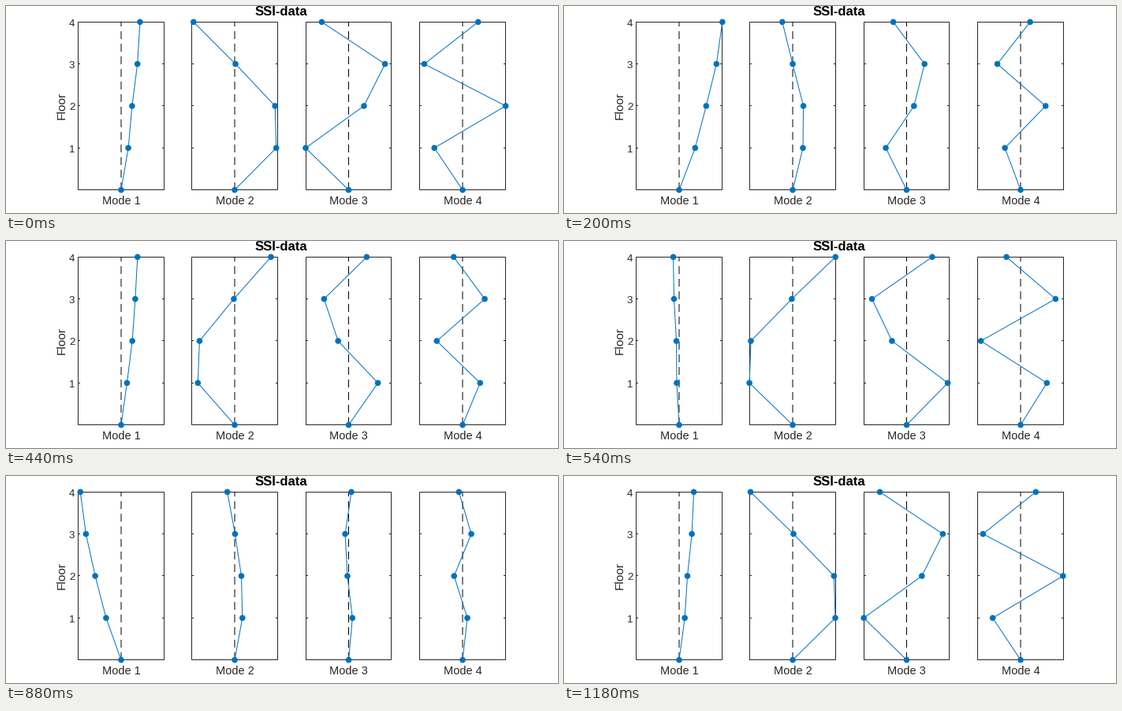
Recreate the animation shown at these times as a matplotlib script. Size 700 by 263 pixels, loop 1.2 s.

```python
import numpy as np
import matplotlib.pyplot as plt
from matplotlib.animation import FuncAnimation
from matplotlib.patches import Circle, Rectangle

W, H, DPI = 700, 263, 100
FRAMES, INTERVAL = 60, 20
BLUE, INK = "#0072BD", "#262626"
TOP, BOTTOM = 20.5, 233.5
FLOOR_Y = 233.7 - 53.35 * np.arange(5)

# Left and right edge of each panel
PANELS = [(91.5, 200.5), (235.5, 344.5), (380.5, 488.5), (524.5, 633.5)]

# Complex mode shapes in pixels, ground floor to top floor
SHAPES = np.array([
    [0, 9.1 + 18.2j, 13.9 + 31.6j, 20.7 + 42.7j, 23.9 + 49.5j],
    [0, 52.7 - 15.4j, 51.2 - 13.9j, 1 - 0.55j, -52.2 + 14.9j],
    [0, -54.5 + 0.9j, 19.4 - 0.5j, 46.1 - 0.4j, -34.1 + 0.1j],
    [0, -35.8 - 2.3j, 54.6 + 5.1j, -48.6 - 6.0j, 19.7 + 2.6j],
])

plt.rcParams["font.family"] = "Liberation Sans"


def px(size):
    """Pixels to points."""
    return size * 72 / DPI


fig = plt.figure(figsize=(W / DPI, H / DPI), dpi=DPI, facecolor="white")
ax = fig.add_axes([0, 0, 1, 1])
ax.set_xlim(0, W)
ax.set_ylim(H, 0)
ax.axis("off")


def label(x, y, text, size, ha="center", **style):
    style = {"color": INK, **style}
    ax.text(x, y, text, fontsize=px(size), ha=ha, va="baseline",
            rotation_mode="anchor", **style)


def stroke(x, y, color, **style):
    """One-pixel line placed exactly, without pixel snapping."""
    line, = ax.plot(x, y, color=color, lw=px(1), snap=False, **style)
    return line


def draw_panel(left, right, name):
    """Draw the fixed parts of a panel; return its moving line and dots."""
    mid = (left + right) / 2
    ax.add_patch(Rectangle((left, TOP), right - left, BOTTOM - TOP, fill=False,
                           ec=INK, lw=px(1), snap=False, zorder=1))
    for y in np.floor(FLOOR_Y[1:4]) + 0.5:
        for edge, inward in ((left, 1), (right, -1)):
            stroke([edge, edge + 2.5 * inward], [y, y], INK,
                   solid_capstyle="butt", zorder=1)
    stroke([mid, mid], [234, 20], "black", dashes=(10, 6),
           dash_capstyle="butt", zorder=2)
    label(mid, 252, name, 14.5)

    line = stroke([], [], BLUE, zorder=3)
    dots = [ax.add_patch(Circle((mid, y), 3.8, fc=BLUE, lw=0, snap=False,
                                zorder=4)) for y in FLOOR_Y]
    return mid, line, dots


panels = [draw_panel(*edges, f"Mode {i + 1}") for i, edges in enumerate(PANELS)]

for floor in range(1, 5):
    label(87.3, FLOOR_Y[floor] + 5.3, str(floor), 13.33, ha="right")
label(75, 126.2, "Floor", 15.4, rotation=90)
label(349, 12, "SSI-data", 16.6, color="black", weight="bold")


def update(frame):
    turn = np.exp(-2j * np.pi * frame / FRAMES)
    for (mid, line, dots), shape in zip(panels, SHAPES):
        x = mid + (shape * turn).real
        line.set_data(x, FLOOR_Y)
        for dot, center in zip(dots, zip(x, FLOOR_Y)):
            dot.center = center


anim = FuncAnimation(fig, update, frames=FRAMES, interval=INTERVAL,
                     repeat=True, repeat_delay=0)
plt.show()
```
